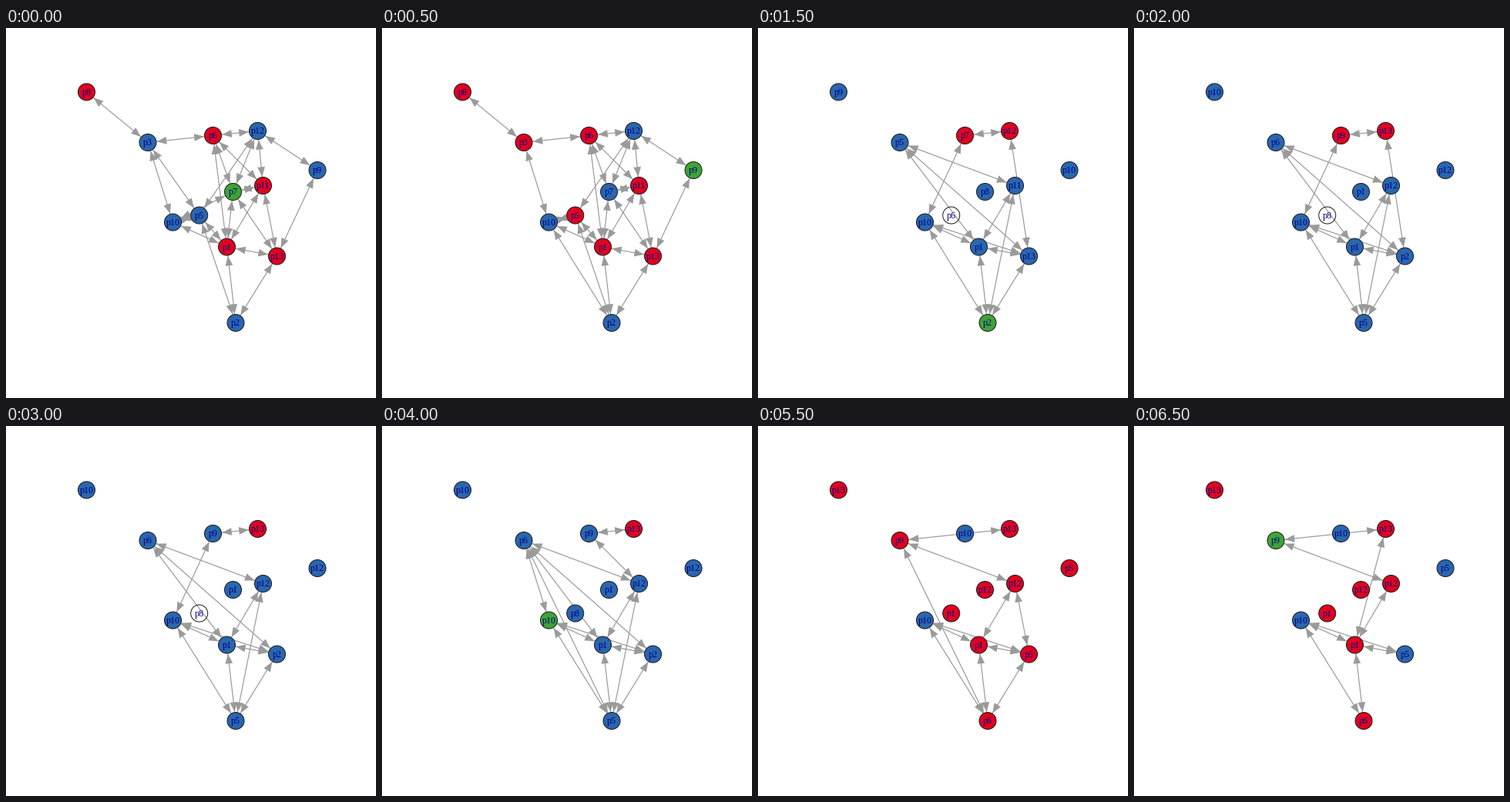
A matplotlib script that plays this animation: 480x480 px, repeating every 7 s.

```python
import numpy as np
import matplotlib.pyplot as plt
from matplotlib.animation import FuncAnimation
from matplotlib.patches import Circle, Polygon

SIZE, DPI = 480, 100
PX = 72 / DPI
GREY = "#9a9a9a"
FILL = {"r": "#de0420", "b": "#2a66ad", "g": "#3ea336", "w": "none"}
RADIUS, TIP, HEAD, HALF = 11, 11.8, 12.5, 4.9

NODES = {
    "A": (104.5, 83), "B": (184, 148.5), "C": (268.5, 139.5),
    "D": (326.5, 133.5), "E": (404, 184.5), "F": (333.5, 204.5),
    "G": (294.5, 212.5), "H": (250.7, 243), "I": (216.5, 252),
    "J": (286.5, 284), "K": (351.5, 296), "L": (298, 382.5),
}

NAMES_START = "8 3 6 12 9 11 7 5 10 1 13 2"
NAMES_SHIFT = "9 5 7 12 10 11 8 6 10 1 13 2"
NAMES_MID = "10 6 9 13 12 12 1 8 10 1 2 5"
NAMES_END = "13 9 10 13 5 12 12 1 10 1 5 6"

EDGES_START = ("AB BC BH BI CD CF CG CJ DE DF DG DH EK FG FJ FK GI GJ GK "
               "HI HJ HL IJ JK JL KL")
EDGES_MID = "BF BJ BK CD CI DK FJ FL IJ IK IL JK JL KL"
EDGES_END = "BD BF BL FJ FK FL IJ IK IL JK JL KL"

# node colours, new label row, new edge set, added edges, cut edges
STEPS = [
    ("rbrbbrgbbrrb", NAMES_START, EDGES_START, "", ""),
    ("rrrbgrbrbrrb", "", "", "IL", "BH GI"),
    ("rbrgbrbrbrrb", "", "", "BE EI EG CL", ""),
    ("bbrrbbbwbbbg", NAMES_SHIFT, EDGES_MID, "", ""),
    ("bbrrbbbwbbbb", NAMES_MID, "", "", ""),
    ("bbgrbbbwbbbb", "", "", "", ""),
    ("bbbrbbbwbbbb", "", "", "", "DK"),
    ("bbgrbbbwbbbb", "", "", "BI BL", ""),
    ("bbbrbbbbgbbb", "", "", "CF", "CI"),
    ("rgbrbrrbbbbr", "", "", "", ""),
    ("rbrrrrrrbrrr", NAMES_END, EDGES_END, "", ""),
    ("rrbrrrrrbrrr", "", "", "", "FL"),
    ("rrbrbrrrbrrr", "", "", "DJ", "BL FK"),
    ("rgbrbrrrbrbr", "", "", "", "KL"),
]


def build_states():
    states, names, edges = [], [], set()
    for fills, new_names, new_edges, added, cut in STEPS:
        names = new_names.split() or names
        edges = set(new_edges.split()) or edges
        edges = (edges | set(added.split())) - set(cut.split())
        states.append((fills, names, sorted(edges)))
    return states


STATES = build_states()

fig = plt.figure(figsize=(SIZE / DPI, SIZE / DPI), dpi=DPI, facecolor="white")
ax = fig.add_axes([0, 0, 1, 1])


def arrow_head(node, unit):
    tip = node + unit * TIP
    base = tip + unit * HEAD
    side = np.array([-unit[1], unit[0]]) * HALF
    ax.add_patch(Polygon([tip, base + side, base - side],
                         fc=GREY, ec="none", zorder=2))


def draw_edge(edge):
    a, b = (np.array(NODES[key], float) for key in edge)
    unit = (b - a) / np.hypot(*(b - a))
    start, end = a + unit * RADIUS, b - unit * RADIUS
    ax.plot([start[0], end[0]], [start[1], end[1]], color=GREY,
            lw=1.2 * PX, solid_capstyle="butt", zorder=1)
    arrow_head(a, unit)
    arrow_head(b, -unit)


def draw_node(pos, fill, name):
    ax.add_patch(Circle(pos, RADIUS, fc=FILL[fill], ec="#1a1a1a",
                        lw=PX, zorder=3))
    ax.text(pos[0], pos[1] + 3.8, "p" + name, color="#00008b",
            family="Liberation Serif", size=12 * PX,
            ha="center", va="baseline", zorder=4)


def draw(i):
    ax.clear()
    ax.set(xlim=(0, SIZE), ylim=(SIZE, 0))
    ax.axis("off")
    fills, names, edges = STATES[i % len(STATES)]
    for edge in edges:
        draw_edge(edge)
    for pos, fill, name in zip(NODES.values(), fills, names):
        draw_node(pos, fill, name)
    return []


anim = FuncAnimation(fig, draw, frames=len(STATES), interval=500,
                     init_func=lambda: draw(0), repeat=True, repeat_delay=0,
                     blit=False)
plt.show()
```
